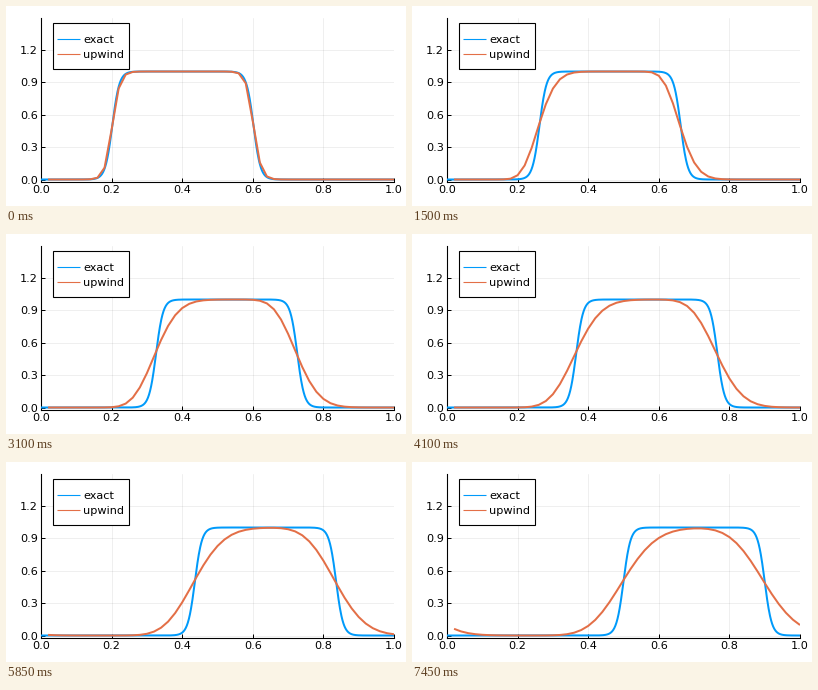
A matplotlib script that plays this animation: 400 by 200 pixels, repeating every 7500 ms.

```python
import numpy as np
import matplotlib.pyplot as plt
from matplotlib.animation import FuncAnimation
from matplotlib.lines import Line2D
from matplotlib.patches import Rectangle

W, H, DPI = 400, 200, 100
FRAMES, INTERVAL = 150, 50
PX = 72 / DPI  # one pixel in points
BLUE, ORANGE = "#009afa", "#e36f47"

# Periodic advection at unit speed, first-order upwind
N, DT, EPS = 50, 0.002, 0.02
C = DT * N
x_grid = np.arange(1, N + 1) / N
x_fine = np.linspace(0, 1, 1001)


def pulse(x):
    return 0.5 * (np.tanh((x - 0.2) / EPS) - np.tanh((x - 0.6) / EPS))


def solve(steps):
    u = pulse(x_grid)
    history = []
    for _ in range(steps):
        u = u - C * (u - np.roll(u, 1))
        history.append(u)
    return history


upwind = solve(FRAMES)

plt.rcParams["font.family"] = "DejaVu Sans"
fig = plt.figure(figsize=(W / DPI, H / DPI), dpi=DPI, facecolor="white")

LEFT, RIGHT, TOP, BOTTOM = 35, 388, 12, 175.5
Y0, Y_UNIT = 173.5, 108
ax = fig.add_axes([LEFT / W, 1 - BOTTOM / H, (RIGHT - LEFT) / W, (BOTTOM - TOP) / H])
ax.set_xlim(0, 1)
ax.set_ylim((Y0 - BOTTOM) / Y_UNIT, (Y0 - TOP) / Y_UNIT)
ax.set_xticks(np.arange(6) * 0.2, [f"{0.2 * k:.1f}" for k in range(6)])
ax.set_yticks(np.arange(5) * 0.3, [f"{0.3 * k:.1f}" for k in range(5)])
ax.tick_params(direction="in", length=4 * PX, width=PX, labelsize=11.3 * PX)
ax.tick_params(axis="x", pad=3.5 * PX)
ax.tick_params(axis="y", pad=3 * PX)
ax.grid(color="black", alpha=0.1, lw=0.6 * PX)
ax.set_axisbelow(True)
for side in ("top", "right"):
    ax.spines[side].set_visible(False)
for side in ("left", "bottom"):
    ax.spines[side].set_linewidth(1.1 * PX)
    ax.spines[side].set_zorder(1)

style = dict(lw=2 * PX, solid_joinstyle="round", solid_capstyle="butt", zorder=3)
exact_line, = ax.plot([], [], color=BLUE, **style)
upwind_line, = ax.plot([], [], color=ORANGE, **style)

# Legend, placed in pixels from the top left
stage = fig.add_axes([0, 0, 1, 1])
stage.set(xlim=(0, W), ylim=(H, 0))
stage.axis("off")
stage.add_patch(Rectangle((46.5, 17), 76, 45.5, fc="white", ec="black", lw=1.1 * PX))
for name, color, y in (("exact", BLUE, 32.5), ("upwind", ORANGE, 47.5)):
    stage.add_line(Line2D([51, 74], [y, y], color=color, lw=1.1 * PX, solid_capstyle="butt"))
    stage.text(77.5, y + 4.3, name, fontsize=11.3 * PX, va="baseline")


def draw(i):
    exact_line.set_data(x_fine, pulse(x_fine - (i + 1) * DT))
    upwind_line.set_data(x_grid, upwind[i])
    return exact_line, upwind_line


anim = FuncAnimation(fig, draw, frames=FRAMES, interval=INTERVAL, repeat=True, repeat_delay=0)
plt.show()
```
